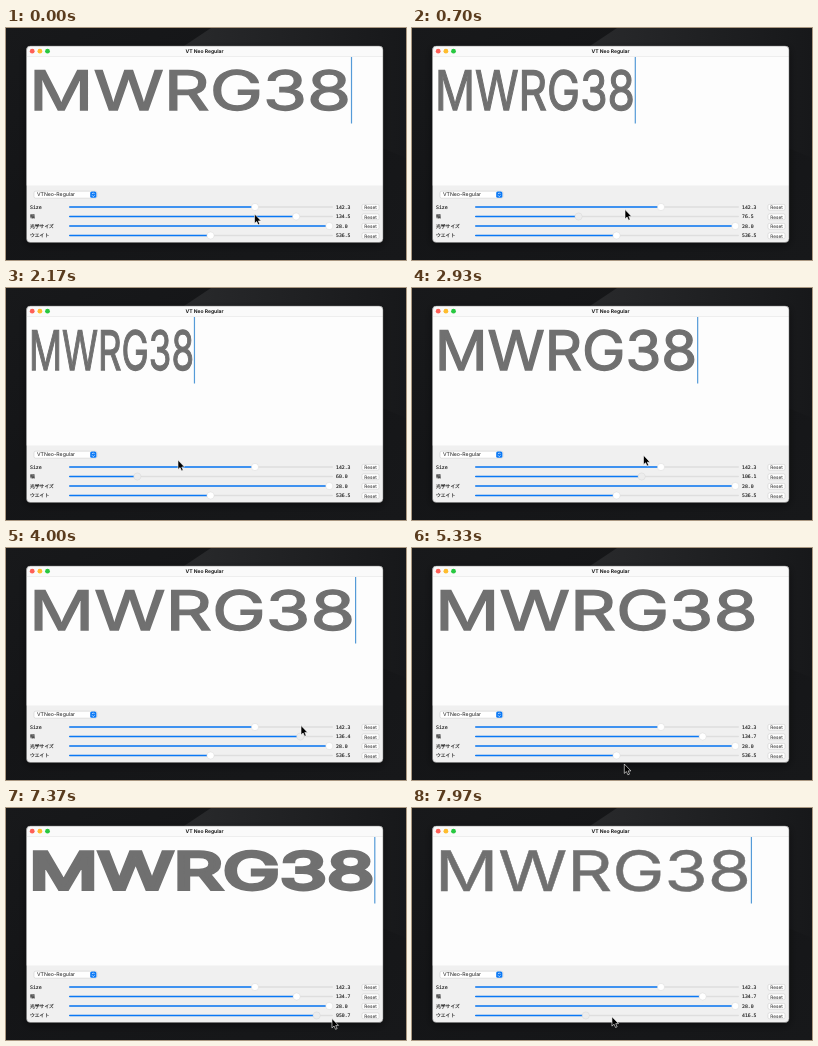
An HTML page for the animation above (8000 ms loop, 400 by 232 pixels).

```html
<!DOCTYPE html>
<html lang="ja">
<head>
<meta charset="utf-8">
<title>Variable font sliders</title>
<style>
  html, body { margin: 0; width: 100%; height: 100%; overflow: hidden; background: #17181a; }
  svg { display: block; width: 400px; height: 232px; }
  text { font-family: Inter, "Noto Sans CJK JP", "Noto Sans CJK", sans-serif; fill: #1c1c1c; text-rendering: geometricPrecision; }
  .mono { font-family: "DejaVu Sans Mono", "Noto Sans CJK JP", "Noto Sans CJK", monospace; font-size: 4.8px; stroke: #1c1c1c; stroke-width: .12; }
  .control { fill: #fff; stroke: #c6c6c6; stroke-width: .5; }
  #word { font-size: 56.4px; font-weight: 400; fill: #707070; stroke-miterlimit: 3; vector-effect: non-scaling-stroke; }
</style>
</head>
<body>
<svg viewBox="0 0 400 232">
  <defs>
    <linearGradient id="desk" x1="0" y1="0" x2="1" y2="1">
      <stop offset="0" stop-color="#18191b"/>
      <stop offset=".4" stop-color="#141517"/>
      <stop offset="1" stop-color="#17181a"/>
    </linearGradient>
    <linearGradient id="glow">
      <stop offset="0" stop-color="#2a2b2d"/>
      <stop offset="1" stop-color="#17181a"/>
    </linearGradient>
    <filter id="shade" x="-20%" y="-20%" width="140%" height="140%">
      <feDropShadow dx="0" dy="2" stdDeviation="4" flood-opacity=".5"/>
    </filter>
    <clipPath id="frame"><rect x="20.5" y="18" width="356.5" height="196.5" rx="4"/></clipPath>
  </defs>

  <rect width="400" height="232" fill="url(#desk)"/>
  <path d="M205 0H400V130L160 30Z" fill="url(#glow)"/>
  <rect x="20.5" y="18" width="356.5" height="196.5" rx="4" filter="url(#shade)"/>
  <g clip-path="url(#frame)">
    <rect x="20" y="18" width="358" height="197" fill="#f0f0f0"/>
    <rect x="20" y="18" width="358" height="11" fill="#fafafa"/>
    <rect x="20" y="28.6" width="358" height=".4" fill="#dcdcdc"/>
    <rect x="20" y="29" width="358" height="128.5" fill="#fdfdfd"/>
    <circle cx="26.2" cy="23.2" r="2.4" fill="#ff5f57"/>
    <circle cx="33.9" cy="23.2" r="2.4" fill="#febc2e"/>
    <circle cx="41.5" cy="23.2" r="2.4" fill="#28c840"/>
    <text x="198.5" y="25" text-anchor="middle" font-size="5" font-weight="700">VT Neo Regular</text>
    <text id="word">MWRG38</text>
    <rect id="caret" y="29" width="1.2" height="66.5" fill="#559bd8"/>

    <rect class="control" x="28" y="163.2" width="63" height="7" rx="1.7"/>
    <text x="31" y="168.4" font-size="5.2">VTNeo-Regular</text>
    <rect x="84.2" y="163.6" width="6.2" height="6.2" rx="1.5" fill="#0a78f5"/>
    <path d="M86 166.1l1.3-1.3 1.3 1.3M86 167.3l1.3 1.3 1.3-1.3" fill="none" stroke="#fff" stroke-width=".7"/>
    <g id="rows"></g>
  </g>
  <rect x="20.5" y="18" width="356.5" height="196.5" rx="4" fill="none" stroke="#777" stroke-width=".5"/>
  <path id="pointer" d="M0 0V9.4L2.1 7.5 3.6 10.8 5.2 10.1 3.8 6.9H6.6Z" fill="#000" stroke="#fff" stroke-width=".6"/>
</svg>
<script>
const LOOP = 8000;
const byId = id => document.getElementById(id);

const mix = (a, b, u) => a + (b - a) * u;
const ease = u => (1 - Math.cos(Math.PI * u)) / 2;
const ramp = (t, from, to) => ease(Math.min(1, Math.max(0, (t - from) / (to - from))));

// Swings from each turning point [time, value] to the next, then holds
const swing = turns => t => turns.reduce((value, [at, next], i) =>
  i ? mix(value, next, ramp(t, turns[i - 1][0], at)) : next, 0);

const widthAt = swing([[-150, 149], [420, 60], [1380, 144], [2180, 60],
  [2600, 134], [3060, 99.9], [4000, 136.4], [4330, 134.7]]);
const weightAt = swing([[5600, 536.5], [6050, 350], [6500, 795],
  [6982, 400], [7430, 975], [7900, 408], [8300, 520]]);

const knobX = (n, [min, max]) => 67.3 + (n - min) / (max - min) * 256;
const WIDTH = [30, 150], WEIGHT = [1, 1000];

function addSlider(row, label, range) {
  const y = 179 + 9.5 * row;
  const g = document.createElementNS("http://www.w3.org/2000/svg", "g");
  g.innerHTML = `
    <text class="mono" x="24" y="${y + 1.9}">${label}</text>
    <rect x="63" y="${y - .8}" width="264" height="1.6" rx=".8" fill="#dedede"/>
    <rect class="fill" x="63" y="${y - .8}" height="1.6" rx=".8" fill="#0a78f5"/>
    <circle class="knob" cy="${y}" r="3.6" stroke="#d2d2d2" stroke-width=".4"/>
    <text class="mono value" x="330" y="${y + 1.9}"></text>
    <rect class="control" x="356" y="${y - 2.6}" width="17" height="5.8" rx="1.4"/>
    <text x="364.5" y="${y + 2}" text-anchor="middle" font-size="4.7">Reset</text>`;
  byId("rows").append(g);
  const [fill, knob, value] = [".fill", ".knob", ".value"].map(s => g.querySelector(s));
  return (n, pressed) => {
    const x = knobX(n, range);
    fill.setAttribute("width", x - 63);
    knob.setAttribute("cx", x);
    knob.setAttribute("fill", pressed ? "#ececec" : "#fff");
    value.textContent = n.toFixed(1);
  };
}

addSlider(0, "Size", [0, 200.5])(142.3);
const setWidth = addSlider(1, "幅", WIDTH);
addSlider(2, "光学サイズ", [17, 28])(28);
const setWeight = addSlider(3, "ウエイト", WEIGHT);

const word = byId("word"), caret = byId("caret"), pointer = byId("pointer");
const CAP = 41, LEFT = 23;

// The width axis sets the advance, the weight axis the outline
function setWord(width, weight) {
  const advance = 38.4 + 2.11 * width + .055 * (weight - 536.5);
  const bold = Math.max(0, (weight - 350) * .007);
  const sx = advance / word.getComputedTextLength();
  word.setAttribute("transform", `translate(${LEFT} ${83 - bold / 2}) scale(${sx} ${(CAP - bold) / CAP})`);
  word.setAttribute("stroke", "#707070");
  word.setAttribute("stroke-width", bold);
  caret.setAttribute("x", LEFT - .2 + advance);
}

// While dragging, the pointer runs ahead of its knob
const LEAD = 120, GRIP = 15;
function pointerAt(t) {
  const stops = [
    [knobX(widthAt(t + LEAD), WIDTH) + GRIP, 186 - .0064 * t],
    [295, 177.5],
    [212.3, 216],
    [knobX(weightAt(t + LEAD), WEIGHT) + GRIP, 212.3 - .003 * (t - 6770)]
  ];
  const moves = [ramp(t, 3500, 3900), ramp(t, 4640, 5300), ramp(t, 5350, 5700)];
  return [0, 1].map(axis => moves.reduce((p, u, i) => mix(p, stops[i + 1][axis], u), stops[0][axis]));
}

function draw(t) {
  const width = widthAt(t), weight = weightAt(t);
  setWidth(width, t >= 30 && t < 4530);
  setWeight(weight, t >= 5600);
  setWord(width, weight);
  caret.setAttribute("opacity", t > 4850 && t < 5420 ? 0 : 1);
  pointer.setAttribute("transform", `translate(${pointerAt(t)})`);
}

const start = performance.now();
function tick() {
  draw((performance.now() - start) % LOOP);
  requestAnimationFrame(tick);
}
tick();
</script>
</body>
</html>
```
